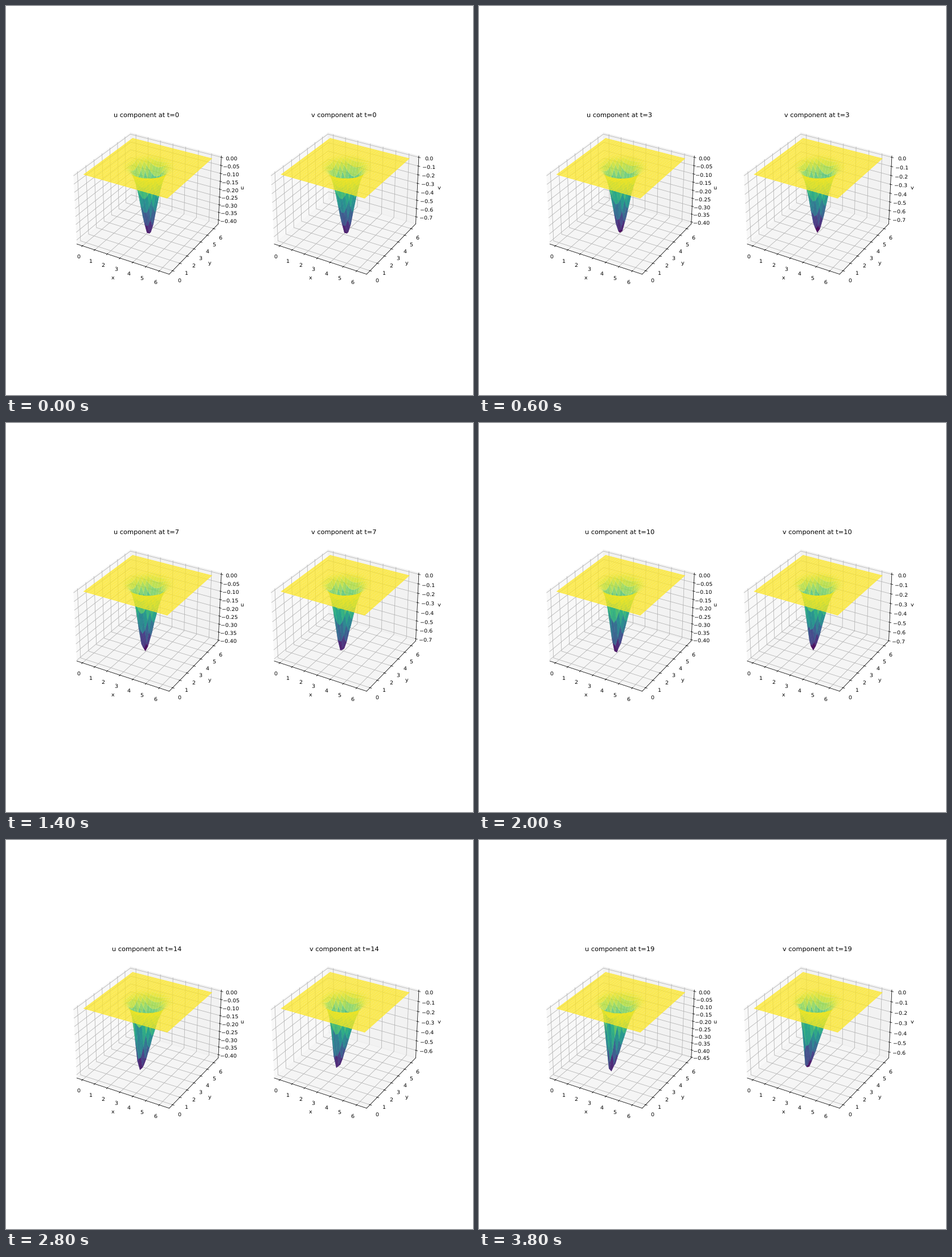
Animation of 820 by 683 pixels, one loop 4000 ms. Source, as a matplotlib script:

```python
import numpy as np
import matplotlib.pyplot as plt
from matplotlib.animation import FuncAnimation

plt.rcParams["text.hinting"] = "none"

STEPS = 20
N = 32
WIDTH = 1.8
BULK = 0.2  # share of the drift that moves the whole well

axis = np.linspace(0, 2 * np.pi, N)
X, Y = np.meshgrid(axis, axis)


def well(dx, dy):
    """Unit bump carried along by its own height, solved by bisection."""
    lo, hi = np.zeros_like(X), np.ones_like(X)
    for _ in range(40):
        s = (lo + hi) / 2
        move = BULK + (1 - BULK) * s
        r2 = (X - np.pi - move * dx) ** 2 + (Y - np.pi - move * dy) ** 2
        below = s < np.exp(-WIDTH * r2)
        lo = np.where(below, s, lo)
        hi = np.where(below, hi, s)
    return lo


def field(step, depth, drift_x, drift_y):
    k = step / (STEPS - 1)
    bump = well(drift_x * k, drift_y * k)
    return -depth * bump / bump.max()


def u(t):
    return field(t, 0.417 - 0.0055 * t + 0.00037 * t**2, -0.37, -0.92)


def v(t):
    return field(t, 0.770 - 0.0103 * t + 0.0002 * t**2, -0.65, -0.57)


fig = plt.figure(figsize=(12, 10), dpi=68.34)
ax_u = fig.add_subplot(121, projection="3d")
ax_v = fig.add_subplot(122, projection="3d")


def plot(ax, name, values, t):
    ax.clear()
    ax.plot_surface(X, Y, values, cmap="viridis", alpha=0.8)
    ax.set_title(f"{name} component at t={t}")
    ax.set_xlabel("x")
    ax.set_ylabel("y")
    ax.set_zlabel(name)


def draw(t):
    plot(ax_u, "u", u(t), t)
    plot(ax_v, "v", v(t), t)
    return []


anim = FuncAnimation(fig, draw, frames=STEPS, interval=200, repeat=True,
                     repeat_delay=0)
plt.show()
```
